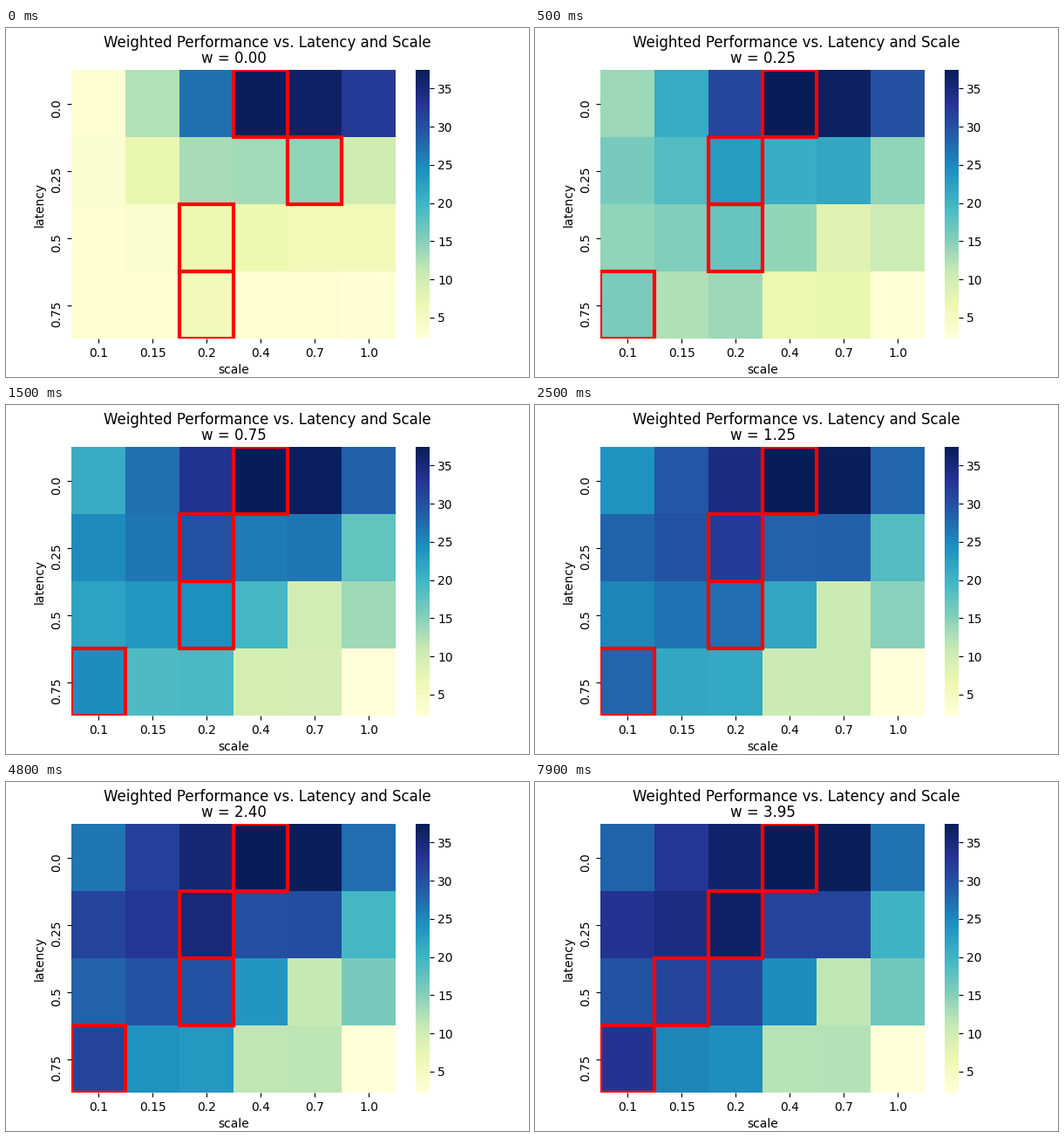
Recreate the animation shown at these times as a matplotlib script. Size 600 by 400 pixels, loop 8000 ms.

```python
import numpy as np
import matplotlib.pyplot as plt
from matplotlib.animation import FuncAnimation
from matplotlib.patches import Rectangle

FRAMES, STEP = 80, 0.05
VMIN, VMAX = 2.25, 37.45
SCALES = ["0.1", "0.15", "0.2", "0.4", "0.7", "1.0"]
LATENCIES = ["0.0", "0.25", "0.5", "0.75"]

# Scores at the lowest and highest weight, in eighths of the colour range
START = np.array([
    [0.20, 2.30, 5.65, 7.95, 7.75, 6.85],
    [0.25, 1.10, 2.45, 2.50, 2.75, 1.80],
    [0.20, 0.30, 1.05, 1.03, 0.85, 0.85],
    [0.20, 0.20, 0.80, 0.20, 0.20, 0.15],
])
END = np.array([
    [5.88, 6.95, 7.66, 8.00, 7.94, 5.62],
    [7.00, 7.30, 7.75, 6.60, 6.60, 4.08],
    [6.25, 6.62, 6.58, 5.08, 2.10, 3.25],
    [7.00, 5.22, 5.05, 2.22, 2.25, 0.00],
])


def saturate(w, k=0.4):
    return w / (w + k)


def scores(w):
    s = saturate(w) / saturate(STEP * (FRAMES - 1))
    return VMIN + (VMAX - VMIN) / 8 * (START + (END - START) * s)


fig, ax = plt.subplots(figsize=(6, 4), dpi=100)
fig.suptitle("Weighted Performance vs. Latency and Scale")
mesh = ax.pcolormesh(scores(0), cmap="YlGnBu", vmin=VMIN, vmax=VMAX)
bar = fig.colorbar(mesh, ax=ax)
bar.outline.set_linewidth(0)

ax.spines[:].set_visible(False)
ax.set(xlim=(0, 6), ylim=(4, 0), xlabel="scale", ylabel="latency")
ax.set_xticks(np.arange(6) + 0.5, SCALES)
ax.set_yticks(np.arange(4) + 0.5, LATENCIES, rotation="vertical")
title = ax.set_title("w = 0.00")

boxes = [ax.add_patch(Rectangle((0, row), 1, 1, fill=False, edgecolor="red", lw=3))
         for row in range(4)]


def update(i):
    w = i * STEP
    grid = scores(w)
    mesh.set_array(grid)
    title.set_text(f"w = {w:.2f}")
    for row, (box, best) in enumerate(zip(boxes, grid.argmax(axis=1))):
        box.set_xy((best, row))
    return [mesh, title, *boxes]


anim = FuncAnimation(fig, update, frames=FRAMES, interval=100, repeat=True,
                     repeat_delay=0)
plt.show()
```
